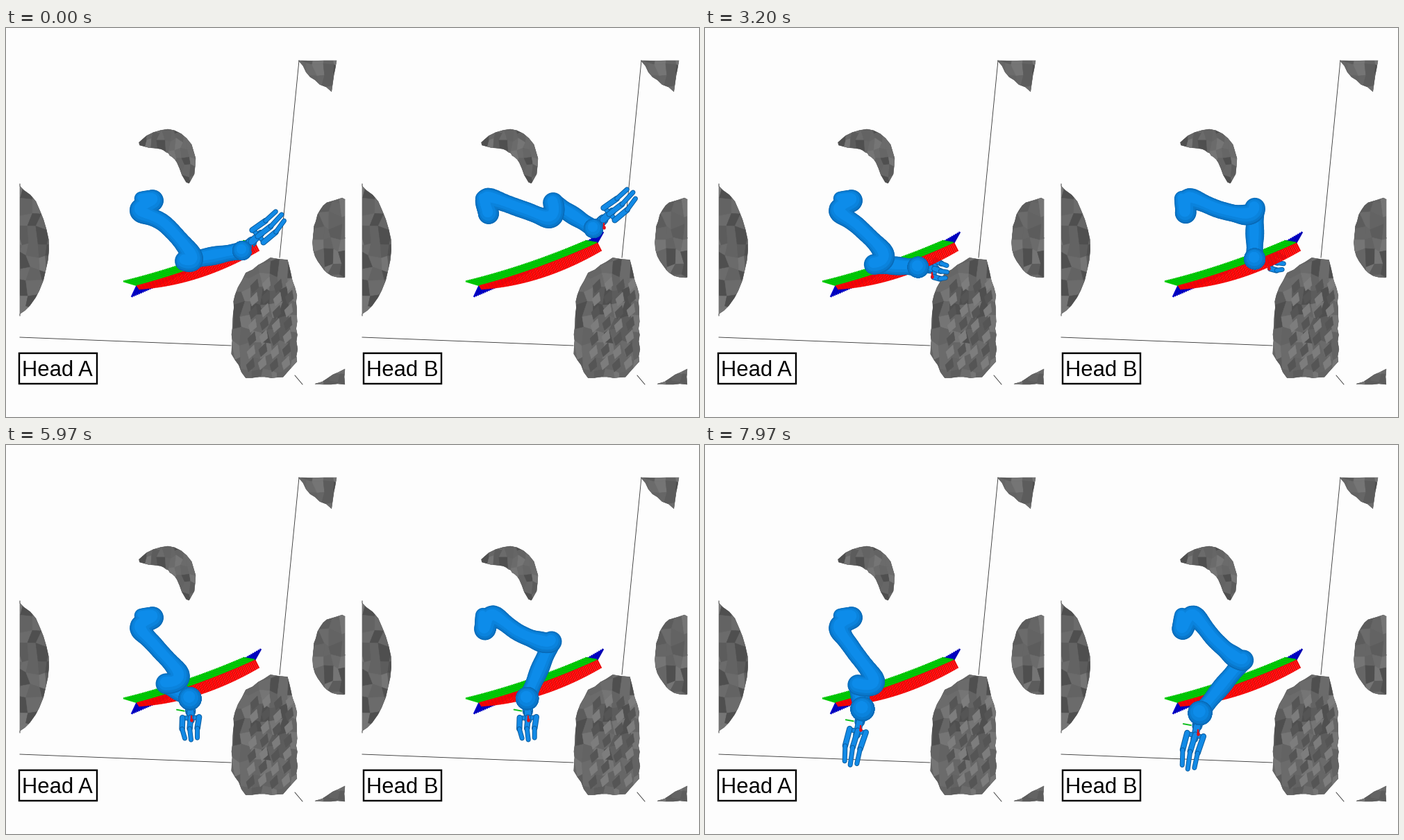
Recreate the animation shown at these times as a matplotlib script. Size 998 px wide and 561 px high, loop 8 s.

```python
import numpy as np
import matplotlib.pyplot as plt
from matplotlib.animation import FuncAnimation
from matplotlib.collections import LineCollection, PolyCollection
from matplotlib.patches import Polygon, Rectangle

W, H = 998, 561
FRAMES, INTERVAL = 200, 40
PT = 0.72  # points per pixel
SHIFT = np.array([493, 0])  # from the left view to the right one
VIEW = (20, 47), (488, 514)

fig = plt.figure(figsize=(W / 100, H / 100), dpi=100, facecolor="#fdfdfd")
ax = fig.add_axes([0, 0, 1, 1])
ax.set_xlim(0, W)
ax.set_ylim(H, 0)
ax.axis("off")


def spline(keys, s):
    """Smooth curve through evenly timed keys, s from 0 to 1."""
    keys = np.asarray(keys, float)
    last = len(keys) - 1
    slope = np.gradient(keys, axis=0, edge_order=min(last, 2))
    x = np.atleast_1d(s) * last
    i = np.clip(x.astype(int), 0, last - 1)
    u = (x - i)[:, None]
    return ((2 * u**3 - 3 * u**2 + 1) * keys[i] + (3 * u**2 - 2 * u**3) * keys[i + 1]
            + (u**3 - 2 * u**2 + u) * slope[i] + (u**3 - u**2) * slope[i + 1])


# ---------- scenery ----------

def oval(cx, cy, a, b, power=2.0):
    w = np.linspace(0, 2 * np.pi, 40)
    c, s = np.cos(w), np.sin(w)
    return np.column_stack([cx + a * np.sign(c) * abs(c) ** (2 / power),
                            cy + b * np.sign(s) * abs(s) ** (2 / power)])


def crescent(start, mid, end, half):
    s = np.linspace(0, 1, 14)
    line = spline([start, mid, end], s)
    d = np.gradient(line, axis=0)
    side = np.column_stack([-d[:, 1], d[:, 0]]) / np.hypot(*d.T)[:, None]
    side *= (2 + half * np.sin(np.pi * s) ** .6)[:, None]
    return np.vstack([line - side, (line + side)[::-1]])


def roughen(outline, rng, step=9, jag=1.1):
    """Split long edges, shake the points and keep them inside the view."""
    pts = []
    for a, b in zip(outline, np.roll(outline, -1, axis=0)):
        n = max(1, int(np.hypot(*(b - a)) / step))
        pts.extend(a + (b - a) * k / n for k in range(n))
    pts = np.array(pts) + rng.uniform(-jag, jag, (len(pts), 2))
    return np.clip(pts, *VIEW)


def facets(outline, step, rng):
    """Jittered grid of quads covering the outline, in random greys."""
    lo, hi = np.min(outline, 0) - step, np.max(outline, 0) + step
    gx, gy = np.meshgrid(np.arange(lo[0], hi[0] + step, step),
                         np.arange(lo[1], hi[1] + step, step * 1.4))
    grid = np.dstack([gx, gy]) + rng.uniform(-.4, .4, gx.shape + (2,)) * step
    quads = np.stack([grid[:-1, :-1], grid[:-1, 1:], grid[1:, 1:], grid[1:, :-1]], 2)
    quads = quads.reshape(-1, 4, 2)
    grey = rng.choice([.31, .36, .39, .4, .42, .46], len(quads))
    return quads, np.repeat(grey[:, None], 3, 1)


def ridges():
    """Tread of slanted chips, lit and shaded in turn."""
    cells = [(col, row) for col in range(4) for row in range(7)]
    corner = np.array([(352 + 17 * col - row, 372 + 19 * row - 3 * (col % 2))
                       for col, row in cells])
    chip = np.array([(0, 0), (10, -10), (12, 2), (3, 10)])
    tones = ["#7d7d7d" if (col + row) % 2 else "#555555" for col, row in cells]
    return corner[:, None] + chip, tones


ROCKS = [
    (oval(0, 320, 61, 96), 14),
    (oval(488, 303, 46, 57, 2.3), 13),
    (crescent((193, 167), (246, 169), (262, 223), 15), 9),
    (np.array([(422, 47), (477, 47), (468, 91), (438, 71)]), 12),
    (np.array([(488, 492), (446, 514), (488, 514)]), 12),
    (np.array([(380, 331), (406, 334), (418, 385), (419, 482), (400, 504),
               (345, 504), (324, 470), (329, 385), (346, 354)]), 14),
]


def draw_rocks(move):
    rng = np.random.default_rng(5)
    for outline, step in ROCKS:
        shape = roughen(outline, rng)
        base = Polygon(shape + move, facecolor="#646464", edgecolor="#505050",
                       lw=.4, zorder=2)
        ax.add_patch(base)
        layers = [facets(shape, step, rng)]
        if outline is ROCKS[-1][0]:
            layers.append(ridges())
        for quads, tones in layers:
            cover = PolyCollection(quads + move, facecolors=tones, edgecolors=tones,
                                   linewidths=.4, zorder=2.1)
            ax.add_collection(cover)
            cover.set_clip_path(base)


def draw_trail(move):
    """Sweep of small axis triads along a shallow curve."""
    s = np.linspace(0, 1, 72)[:, None]
    hump = 4 * s * (1 - s)

    def mix(a, b):
        return np.array(a) * (1 - s) + np.array(b) * s

    start = mix((189, 371), (358, 310)) + hump * (0, 4) + move
    triad = [(mix((-8, 17), (9, -16)), ("#0000cc", "#0000b4")),
             (mix((-20, -6), (-17, -3)), ("#00d200", "#00b90a")),
             (mix((4, 6), (6, 12)) + hump * (0, 7), ("#ff0000", "#ec0505"))]
    for z, (vec, tones) in enumerate(triad):
        colors = [tones[k % 2] for k in range(len(s))]
        ax.add_collection(LineCollection(np.stack([start, start + vec], 1), colors=colors,
                                         linewidths=2.7 * PT, zorder=4 + z / 10))


def draw_view(move, box_x, label):
    for ends in (((422, 47), (394, 331)), ((20, 446), (324, 458)), ((416, 501), (427, 514))):
        ax.plot(*(np.array(ends) + move).T, color="#3a3a3a", lw=.65, zorder=1)
    draw_rocks(move)
    draw_trail(move)
    ax.add_patch(Rectangle((box_x, 469), 112, 44, facecolor="white",
                           edgecolor="black", lw=2.4 * PT, zorder=8))
    ax.text(box_x + 4, 501.5, label, family="Liberation Sans", fontsize=31 * PT, zorder=9)


draw_view(0 * SHIFT, 19, "Head A")
draw_view(SHIFT, 515, "Head B")

# ---------- robot arms ----------

# Each joint passes its points at even times; a single point stays put.
CHAIN_A = [[(195, 246)], [(212, 249)], [(194, 264)], [(229, 283), (213, 295)],
           [(267, 327), (255, 326), (244, 340)], [(258, 336), (240, 342), (220, 346)]]
WRIST_A = [(340, 321), (296, 351), (226, 381)]
CHAIN_B = [[(687, 246)], [(695, 268), (688, 266)], [(694, 246), (704, 247)],
           [(745, 262), (741, 264), (735, 282)], [(783, 274), (778, 272), (762, 306)],
           [(788, 252), (791, 265), (775, 311)]]
WRIST_B = [(846, 289), (818, 312), (775, 346), (750, 366), (712, 387)]

# Wrist to fingertips, shared by both arms.
REACH = [(57, -52), (55, -21), (31, 21), (2, 60), (-18, 81)]

# Width factor and colour from rim to lit centre.
SHADES = [(1, "#086bb9"), (.9, "#0978cc"), (.74, "#0a83dd"), (.5, "#0d8cea")]


class Strokes:
    """One collection of round strokes refilled on every frame."""

    def __init__(self, z):
        self.lines = LineCollection([], capstyle="round", zorder=z)
        ax.add_collection(self.lines)
        self.clear()

    def clear(self):
        self.segs, self.widths, self.colors = [], [], []

    def add(self, pts, width, color):
        pts = np.asarray(pts, float)
        width = np.broadcast_to(width, len(pts))
        self.segs.extend(np.stack([pts[:-1], pts[1:]], 1))
        self.widths.extend((width[:-1] + width[1:]) / 2 * PT)
        self.colors.extend([color] * (len(pts) - 1))

    def tube(self, joints, radii):
        """Shaded limb, a little slimmer between its joints."""
        last = len(joints) - 1
        t = np.linspace(0, last, 8 * last + 1)
        pts = spline(joints, t / last)
        gap = np.hypot(*np.diff(joints, axis=0).T)[np.minimum(t.astype(int), last - 1)]
        pinch = np.clip(gap / 40, 0, 1) * .1 * np.sin(np.pi * t) ** 2
        r = np.interp(t, range(last + 1), radii) * (1 - pinch)
        for k, color in SHADES:
            lit = np.outer(r * (1 - k), (-.15, -.3))
            self.add(pts + lit, 2 * r * k, color)

    def show(self):
        self.lines.set_segments(self.segs)
        self.lines.set_linewidths(self.widths)
        self.lines.set_color(self.colors)


class Arm:
    def __init__(self, chain, wrist, radii):
        self.chain, self.wrist, self.radii = chain, wrist, radii
        self.hand, self.body, self.axes = Strokes(3), Strokes(5), Strokes(6)
        self.parts = self.hand, self.body, self.axes

    def pose(self, s):
        joints = np.array([spline(p * 2 if len(p) == 1 else p, s)[0] for p in self.chain])
        wrist, reach = spline(self.wrist, s)[0], spline(REACH, s)[0]
        for part in self.parts:
            part.clear()
        # The hand dips behind the trail on its way across.
        self.hand.lines.set_zorder(3 if .06 < s < .45 else 4.5)
        root = wrist + reach * 19 / np.hypot(*reach)
        self.draw_hand(wrist, root, wrist + reach)
        elbow, ball = joints[-1], 14 + 3.5 * s
        self.body.tube([elbow, (elbow + wrist) / 2, wrist], [14, 13.5, 12.5])
        self.body.tube(joints, self.radii)
        self.body.tube([wrist, wrist + .1], [ball, ball])
        self.draw_axes(root, s)
        for part in self.parts:
            part.show()

    def draw_hand(self, wrist, root, tip):
        span = tip - root
        length = np.hypot(*span)
        side = np.array([-span[1], span[0]]) / length
        curl = max(0, 48 - length) * .25

        def at(a, b):
            return root + span * a + side * (b + curl * max(0, a - .5))

        def bar(pts, width):
            self.hand.add(pts, width, "#0a5c9f")
            self.hand.add(pts, width - 2, "#128ae6")

        bar([wrist, root], 15)
        bar([at(-.05, -4), at(-.05, 4)], 7)
        bar([at(0, 0), at(.3, 0)], 11)
        bar([at(.22, -10), at(.22, 10)], 7)
        for k in (-1, 0, 1):
            bar([at(.2, 12 * k), at(.6, 11 * k + 2)], 8.5)
            bar([at(.6, 11 * k + 2), at(1 - .06 * abs(k), 9 * k)], 7)

    def draw_axes(self, root, s):
        self.axes.add([root + (1, 6), root + (1, 13)], 2.4, "#e01018")
        self.axes.add([root + (1, 11), root + (1, 12)], 4.5, "#e01018")
        grow = np.clip(5 * s - 2.75, 0, 1)
        if grow > 0:
            end = root + (-12 - 8 * grow, -2 - grow)
            self.axes.add([root + (-9, -1), end], 2, "#10c020")
            self.axes.add([end + (2, 0), end + (2.5, 0)], 4.5 * grow, "#10c020")


arms = [Arm(CHAIN_A, WRIST_A, [10, 15, 16, 12.5, 15, 15]),
        Arm(CHAIN_B, WRIST_B, [11, 15, 15.5, 12.5, 15, 15])]


def update(n):
    for arm in arms:
        arm.pose(n / FRAMES)
    return [part.lines for arm in arms for part in arm.parts]


anim = FuncAnimation(fig, update, frames=FRAMES, interval=INTERVAL, repeat=True,
                     repeat_delay=0, init_func=lambda: update(0))
plt.show()
```
